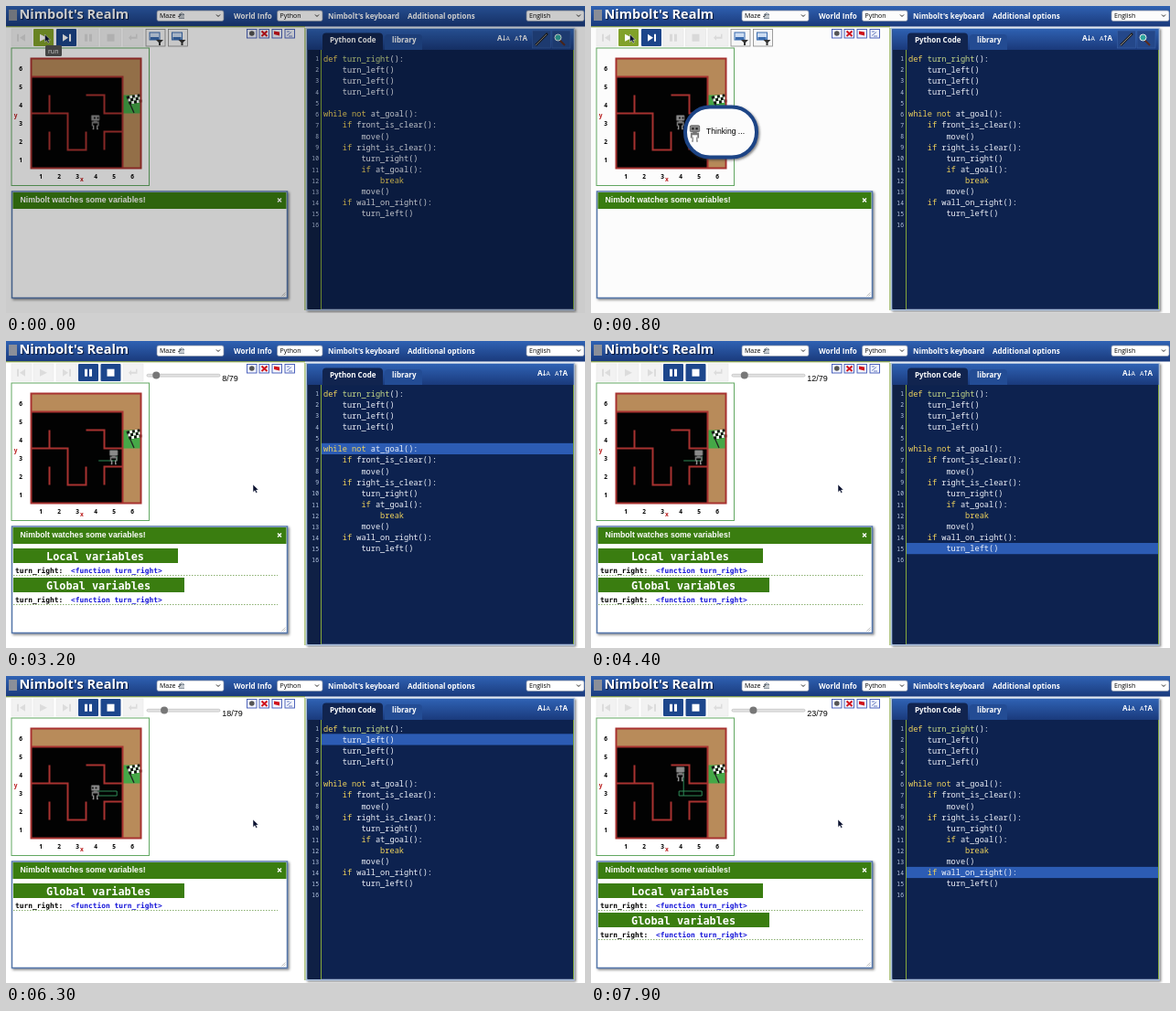
These frames come from a looping animation (633 px wide and 336 px high, 8 s). An HTML page:

```html
<!DOCTYPE html>
<html lang="en">
<head>
<meta charset="utf-8">
<title>Robot maze</title>
<style>
  html, body { margin: 0; width: 100%; height: 100%; overflow: hidden; background: #fff; }
  svg { display: block; }
  text { white-space: pre; font: 7px "Open Sans", sans-serif; }
  .menu { font-weight: 700; font-size: 8px; fill: #fff; }
  .title { font-weight: 700; font-size: 14.5px; fill: #fff; text-shadow: 1px 1.5px 1px #0b1838; }
  .arial { font-family: "Liberation Sans", sans-serif; }
  .code { font: 8.65px "Noto Sans Mono", monospace; fill: #eef2fa; }
  .line { font: 6.4px "Noto Sans Mono", monospace; fill: #b9c9e4; text-anchor: end; }
  .axis { font-weight: 700; font-size: 6.5px; text-anchor: middle; }
  .mono { font: 700 7.9px "DejaVu Sans Mono", monospace; }
  .heading { font-size: 11.85px; fill: #fff; }
  .key { fill: #f0d35c; }
  .def { fill: #c9dc8a; }
</style>
</head>
<body>
<svg id="stage" width="633" height="336" viewBox="0 0 633 336">
  <defs>
    <linearGradient id="bar" x2="0" y2="1">
      <stop stop-color="#2f62b4"/><stop offset="1" stop-color="#1a3a7c"/>
    </linearGradient>
    <filter id="shadow" x="-10%" y="-10%" width="125%" height="130%">
      <feDropShadow dx="1.5" dy="1.5" stdDeviation="1.2" flood-color="#333" flood-opacity=".6"/>
    </filter>
    <g id="body">
      <rect x="-4.5" y="-8" width="9" height="6" rx="1" fill="#8b8b8b" stroke="#444" stroke-width=".6"/>
      <path d="M-2-2h4v1h2v5h-1.5v-3h-5v3H-4v-5h2z" fill="#777"/>
      <path d="M-2 3v4h-1M2 3v4h1" stroke="#999" stroke-width="1.3" fill="none"/>
    </g>
  </defs>
  <g id="page"></g>
</svg>
<script>
const CELL = 20, LOOP = 8000;
const GREEN = '#3a7d10', BLUE = '#1c468c';
const $ = id => document.getElementById(id);

// When each program step is shown, and the code line it highlights.
const stepTimes = [1100, 1400, 1700, 2000, 2200, 2600, 3200, 3200, 3500, 3800, 4100, 4400,
                   4650, 5000, 5400, 5650, 6000, 6300, 6600, 6850, 7100, 7500, 7800];
const stepLines = [1, 6, 7, 8, 9, 14, 15, 6, 7, 9, 14, 15, 6, 7, 8, 9, 10, 2, 3, 4, 11, 13, 14];

// Robot poses: first step, column, row, heading (E N W S).
const poses = [[0, 4, 3, 'E'], [5, 5, 3, 'E'], [8, 5, 3, 'N'], [13, 5, 3, 'W'], [16, 4, 3, 'W'],
               [19, 4, 3, 'S'], [20, 4, 3, 'E'], [21, 4, 3, 'N'], [23, 4, 4, 'N']];
const corner = { E: [1, 1], N: [1, -1], W: [-1, -1], S: [-1, 1] };
const centre = (col, row) => [17.7 + CELL * col, 187.5 - CELL * row];

const program = `def turn_right():
    turn_left()
    turn_left()
    turn_left()

while not at_goal():
    if front_is_clear():
        move()
    if right_is_clear():
        turn_right()
        if at_goal():
            break
        move()
    if wall_on_right():
        turn_left()
`.split('\n');

const rect = (x, y, w, h, fill, more = '') =>
  `<rect x="${x}" y="${y}" width="${w}" height="${h}" fill="${fill}" ${more}/>`;
const text = (x, y, s, cls = '', more = '') => `<text x="${x}" y="${y}" class="${cls}" ${more}>${s}</text>`;
const path = (d, stroke, width = 1, more = '') =>
  `<path d="${d}" fill="none" stroke="${stroke}" stroke-width="${width}" ${more}/>`;
const lineY = n => 60.2 + 12.13 * (n - 1);

const select = (x, w, label) => rect(x, 5, w, 11.5, '#fff', 'rx="2" stroke="#8a94a8" stroke-width=".7"') +
  text(x + 3, 13.3, label) + path(`M${x + w - 8} 9.5l2 2 2-2`, '#222');

function header() {
  return rect(0, 0, 633, 22.5, 'url(#bar)') + rect(0, 22.2, 327, 1.1, '#84a03a') +
    rect(3, 4, 9, 12, '#8b8f99') + text(14.5, 13.5, 'Nimbolt\'s Realm', 'title') +
    select(165, 73, 'Maze ✓') + path('M189 9.5l3-2 3 2zM190 10v3M192 10v3M194 10v3M189 13.5h6', '#456', .6) +
    text(249, 13.5, 'World Info', 'menu') + select(296.5, 49.5, 'Python') +
    text(352, 13.5, 'Nimbolt\'s keyboard', 'menu') +
    text(439, 13.5, 'Additional options', 'menu') + select(569, 63, 'English');
}

function button(x, icon, fill) {
  return rect(x, 25, 22, 19, fill || '#f2f2f2', fill ? 'rx="1"' : 'stroke="#e6e6e6" stroke-width=".6"') +
    `<path transform="translate(${x + 11} 34.7)" d="${icon}" fill="${fill ? '#fff' : '#dcdcdc'}"/>`;
}
const icons = {
  first: 'M-5-4h2v8h-2zM4-4v8l-6-4z',
  play: 'M-4-4l8 4-8 4z',
  next: 'M-4-4l6 4-6 4zM3-4h2v8h-2z',
  pause: 'M-4-4h3v8h-3zM1-4h3v8h-3z',
  stop: 'M-4-4h8v8h-8z',
  reload: 'M-5 0l3-3v2h5v-3h1.5v5h-6.5v2z'
};
function toolbar(running) {
  const pick = (active, color = BLUE) => active ? color : '';
  return button(6, icons.first) + button(30, icons.play, pick(!running, '#83a32a')) +
    button(55, icons.next, pick(!running)) + button(79, icons.pause, pick(running)) +
    button(103.5, icons.stop, pick(running)) + button(128, icons.reload);
}

function fileButton(x) {
  return rect(x, 25.5, 21, 18.5, '#fafafa', 'stroke="#888" stroke-width=".8"') +
    rect(x + 4, 29, 11, 8, '#cfe0f5', 'stroke="#3a6cb0"') + rect(x + 5, 34, 9, 3, '#3a6cb0') +
    `<path d="M${x + 11} 37h8l-3 3v3h-2v-3z" fill="#333"/>`;
}

function smallIcons() {
  const box = x => rect(x, 25.5, 10.5, 9.5, '#f4f6ff', 'stroke="#3d55b5" stroke-width=".9"');
  return [263.5, 277, 291, 305].map(box).join('') + '<circle cx="268.8" cy="30" r="2.8" fill="#555"/>' +
    path('M279.5 27.5l6 5.5m0-5.5l-6 5.5', '#d0121b', 2) +
    '<path d="M293 27.5l6 1v4l-6-1.5z" fill="#d0121b"/>' +
    path('M307 32.5l5-4M307 28h3M309 33h4', '#5a70b8', .9);
}

function maze() {
  let s = rect(6, 46, 150.5, 150.5, '#fff', 'stroke="#62a862" stroke-width="1"') +
    rect(27.5, 57.5, 120, 120, '#b88b5a') + rect(27.5, 77.5, 100, 100, '#020202') +
    rect(127.5, 97.5, 20, 20, '#45a847');
  s += path('M132 99l8 18', '#222', 1.3);
  for (let i = 0; i < 15; i++) {
    const c = i % 5, r = i / 5 | 0;
    s += rect(132.5 + 2.8 * c + r, 98.5 + 3 * r - .5 * c, 2.8, 3, (c + r) % 2 ? '#fff' : '#111');
  }
  s += path('M27.5 57.5h120v120h-120zM27.5 77.5h100v100M47.5 97.5v20M27.5 117.5h40v40h20v-20' +
    'M47.5 137.5v20M87.5 97.5h20v20h20M127.5 137.5h-20v20', '#a83230', 2);
  for (let i = 1; i <= 6; i++)
    s += text(16, 190.5 - CELL * i, i, 'axis') + text(18 + CELL * i, 189, i, 'axis');
  return s + text(10.5, 122, 'y', 'axis', 'fill="#b22"') + text(83, 191.5, 'x', 'axis', 'fill="#b22"');
}

function variables() {
  const block = (id, label, w) => `<g id="${id}">` + rect(8, 227, w, 16, GREEN) +
    text(44, 239.5, label, 'mono heading') + text(10, 253.5, 'turn_right:', 'mono') +
    text(71, 253.5, '&lt;function turn_right&gt;', 'mono', 'fill="#1414d8"') +
    path('M8 256.5h289', '#7da860', .9, 'stroke-dasharray="1.5 1.5"') + '</g>';
  return rect(6.5, 203, 301, 116.5, '#fff', 'stroke="#5577ab" stroke-width="1.5" filter="url(#shadow)"') +
    rect(7.5, 204, 299, 18, GREEN) +
    text(15.5, 214.5, 'Nimbolt watches some variables!', 'arial', 'fill="#fff" style="font-weight:700;font-size:8.7px"') +
    path('M297 210.5l4 4m0-4l-4 4', '#fff', 1.4) + path('M301.5 317.5l4-4m-2 4l2-2', '#aaa', .7) +
    block('locals', 'Local variables', 180) + block('globals', 'Global variables', 187);
}

function editor() {
  const colour = s => s.replace(/\b(def|while|not|if|break)\b/g, '<tspan class="key">$1</tspan>')
    .replace(/(def<\/tspan> )(\w+)/, '$1<tspan class="def">$2</tspan>');
  const toolBox = x => rect(x, 27, 20, 19, '#24488b', 'stroke="#3a62a8" stroke-width=".6"');
  return rect(328.5, 24.5, 292.5, 308, '#11244f', 'stroke="#a9bfdd" stroke-width="1.5" filter="url(#shadow)"') +
    rect(329.5, 25, 291, 23, 'url(#bar)') +
    '<path d="M346 48.5v-15q0-4 4-4h58q4 0 4 4v15z" fill="#11244f"/>' +
    '<path d="M414 48v-13q0-4 4-4h33q4 0 4 4v13z" fill="#234c94"/>' +
    text(354, 40, 'Python Code', 'menu') + text(422, 40, 'library', 'menu') +
    rect(330, 48, 14, 284, '#0f2045') + rect(344, 48, 1, 284, '#86a83c') + rect(620, 48, 1, 284, '#86a83c') +
    rect(326.4, 24, 1, 309, '#86a83c') + rect(345, 0, 275, 12.2, '#2c5cb4', 'id="highlight"') +
    program.map((s, i) => text(342, lineY(i + 1), i + 1, 'line') +
      text(347, lineY(i + 1) + .4, colour(s), 'code')).join('') +
    '<g id="fontSize">' + text(537, 38, 'A', 'menu') + text(546.5, 38, 'A', '', 'fill="#fff"') +
    text(556, 38, 'A', '', 'fill="#fff"') + text(564.5, 38, 'A', 'menu') +
    path('M544.5 32v6m-1.5-2l1.5 2 1.5-2M562.5 38v-6m-1.5 2l1.5-2 1.5 2', '#fff', .8) + '</g>' +
    '<g id="tools">' + toolBox(575.5) + toolBox(597) +
    path('M579 43l13-13', '#222', 2.5) + path('M579 43l12-12', '#bbb', .7) +
    path('M605 37l6 6', '#5a2d20', 2) + '<circle cx="603.5" cy="34.5" r="3.5" fill="#2fa8a0" stroke="#eee"/></g>';
}

const robot = id => `<g id="${id}"><use href="#body"/><g class="eyes">` +
  rect(-2.8, -6, 2, 2, '#222') + rect(.8, -6, 2, 2, '#222') + '</g></g>';

$('page').innerHTML = header() + '<g id="idle">' + toolbar(false) + fileButton(153) + fileButton(177.5) + '</g>' +
  '<g id="running">' + toolbar(true) + rect(154, 36.3, 80, 2.8, '#e4e4e4', 'rx="1.4" stroke="#bbb" stroke-width=".7"') +
  '<circle id="thumb" cy="37.5" r="4" fill="#777"/>' +
  text(236.3, 43.5, '', 'arial', 'id="count" style="font-size:9px"') + '</g>' +
  smallIcons() + maze() + path('', '#2e8b57', 1, 'id="trail"') + robot('robot') + variables() + editor() +
  '<g id="bubble">' + rect(103, 110.5, 78, 55, '#fff', 'rx="27" stroke="#1d4487" stroke-width="4" filter="url(#shadow)"') +
  `<g transform="translate(113.5 140) scale(1.15)">${robot('thinker')}</g>` +
  text(126, 139.5, 'Thinking ...', 'arial', 'style="font-size:8.6px"') + '</g>' +
  '<g id="tooltip">' + rect(43, 43, 18, 12, '#555', 'rx="1.5"') + text(46, 51.5, 'run', '', 'fill="#fff"') + '</g>' +
  '<path id="cursor" d="M0 0v8.5l2-1.8 1.4 2.8 1.5-.7-1.4-2.7h2.6z" fill="#0a1230" stroke="#fff" stroke-width=".5"/>' +
  rect(0, 0, 633, 336, '#000', 'id="dim"');

const show = (id, on) => $(id).style.display = on ? '' : 'none';
const move = (id, x, y) => $(id).setAttribute('transform', `translate(${x} ${y})`);

function draw(t) {
  const step = stepTimes.filter(time => time <= t).length;
  const running = step > 0, inFunction = step >= 18 && step <= 20;
  show('idle', !running);
  show('running', running);
  show('tools', !running);
  show('highlight', running);
  show('tooltip', t < 400);
  show('bubble', t >= 400 && !running);
  show('locals', step > 1 && !inFunction);
  show('globals', step > 1);
  move('globals', 0, inFunction ? 0 : 32);
  move('fontSize', running ? 44 : 0, 0);
  if (running) {
    $('highlight').setAttribute('y', lineY(stepLines[step - 1]) - 9);
    $('thumb').setAttribute('cx', 157.2 + .88 * step);
    $('count').textContent = step + '/79';
  }

  const done = poses.filter(p => p[0] <= step);
  const [, col, row, heading] = done[done.length - 1];
  const [x, y] = centre(col, row);
  move('robot', x, y);
  const eyes = document.querySelector('#robot .eyes');
  eyes.style.display = heading === 'N' ? 'none' : '';
  eyes.setAttribute('transform', `translate(${{ E: 1, W: -1 }[heading] || 0} 0)`);
  $('trail').setAttribute('d', 'M' + done.map(([, c, r, h]) => {
    const [cx, cy] = centre(c, r);
    return [cx + 1 + 2.5 * corner[h][0], cy + 1 + 2.5 * corner[h][1]];
  }).join('L'));

  const k = Math.min(1, Math.max(0, (t - 1100) / 600)), ease = k * k * (3 - 2 * k);
  move('cursor', 42.5 + 227.5 * ease, 31 + 126 * ease);
  $('dim').setAttribute('opacity', .2 * Math.max(0, 1 - t / 850));
}

const start = performance.now();
(function tick() {
  draw((performance.now() - start) % LOOP);
  requestAnimationFrame(tick);
})();
</script>
</body>
</html>
```
